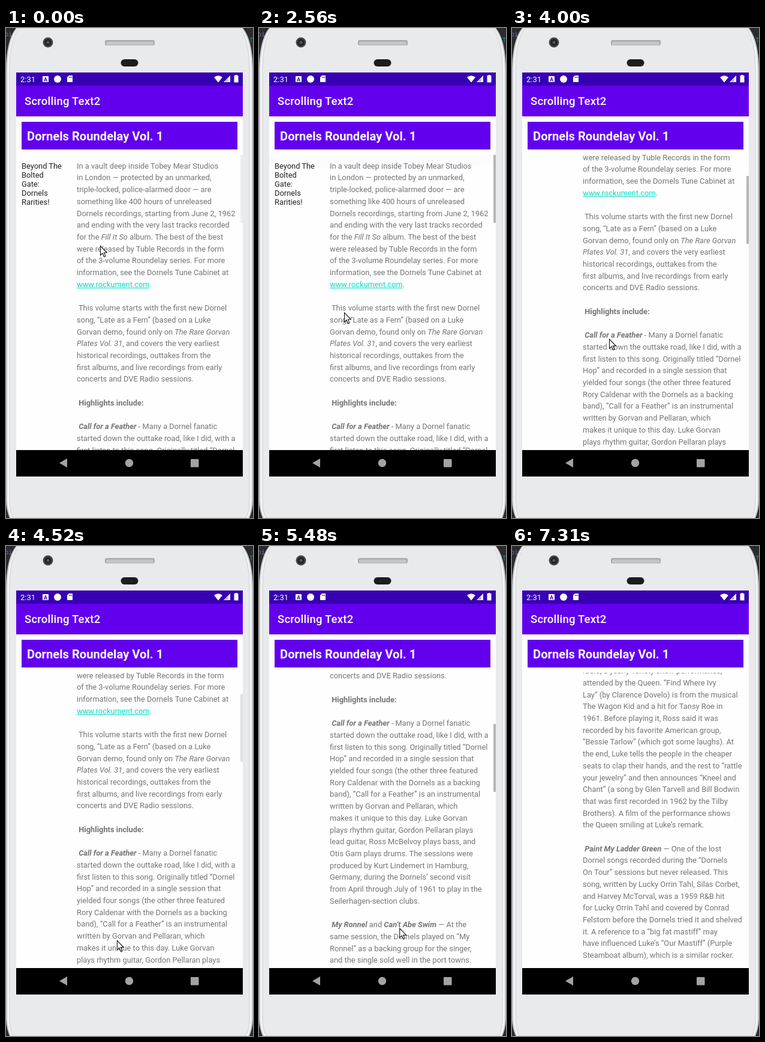
Write an HTML page that moves like this. It is 412 px wide and 815 px high and loops after 7.59 s.

```html
<!DOCTYPE html>
<html lang="en">
<head>
<meta charset="utf-8">
<title>Scrolling Text2</title>
<style>
  html, body { margin: 0; width: 100%; height: 100%; overflow: hidden; background: #2b2b2e; }
  #stage { position: relative; width: 412px; height: 815px; overflow: hidden; font-family: Roboto, sans-serif; }
  #stage > *, #view > * { position: absolute; }
  svg { left: 0; top: 0; }
  .title { left: 31px; top: 111px; font: 500 18.5px/22px Roboto, sans-serif; letter-spacing: .0125em; color: #fff; white-space: pre; }
  .banner { left: 26px; top: 156px; width: 350.5px; height: 46px; padding-left: 9px; background: #6200ee;
    font: 700 20.2px/48px Roboto, sans-serif; color: #fff; white-space: pre; }
  #view { left: 17px; top: 211px; width: 378px; height: 491px; overflow: hidden; }
  #page { left: 0; top: 0; width: 378px; will-change: transform; }
  pre { position: absolute; margin: 0; font: 12.86px/19.7px Roboto, sans-serif; }
  #side { left: 9px; top: 11px; line-height: 15px; color: #222; }
  #body { left: 101px; top: 8.75px; color: #757575; }
  u { color: #03dac5; }
  #bar { left: 374px; top: 0; width: 4px; height: 113px; background: #b6b6b6; }
  .glow { left: -60px; width: 498px; height: 60px; border-radius: 50%; background: #6200ee26; }
  #glowTop { top: -36px; }
  #glowEnd { bottom: -36px; }
</style>
</head>
<body>
<div id="stage">
  <svg width="412" height="815" viewBox="0 0 412 815">
    <rect width="412" height="815" fill="#2b2b2e"/>
    <g font-family="DejaVu Sans Mono, monospace" font-size="10">
      <text x="-2" y="14" fill="#7d68a6">oid</text>
      <text x="406" y="24" fill="#2f8f96">T</text>
    </g>
    <path d="M0 785V72C0 34 7 12 17 0H395C405 12 412 34 412 72V785C412 798 409 808 406 815H6C3 808 0 798 0 785Z" fill="#c2c3c7"/>
    <path d="M2 785V72C2 34 9 12 19 0H393C403 12 410 34 410 72V785C410 798 407 808 404 815H8C5 808 2 798 2 785Z" fill="#f4f4f6"/>
    <path d="M6 785V72C6 34 12 12 22 0H390C400 12 406 34 406 72V785C406 798 404 808 400 815H12C8 808 6 798 6 785Z" fill="#e9eaec" stroke="#cfd0d4"/>
    <circle cx="70" cy="24" r="8.5" fill="#4a4a4d"/>
    <circle cx="70" cy="24" r="6" fill="#242427"/>
    <circle cx="70" cy="24" r="2.5" fill="#55506a"/>
    <rect x="165" y="20" width="83" height="9" rx="3" fill="#a9aaad"/>
    <rect x="167" y="22.5" width="79" height="6" rx="2.5" fill="#c5c6c9"/>
    <rect x="191.5" y="52" width="29" height="12" rx="6" fill="#1d1d20"/>

    <rect x="17" y="74" width="378" height="672" fill="#fefefe"/>
    <rect x="17" y="74" width="378" height="22" fill="#3700b3"/>
    <rect x="17" y="96" width="378" height="51" fill="#6200ee"/>
    <rect x="17" y="702" width="378" height="44"/>
    <g fill="#fff">
      <text x="24" y="90" font-size="13" font-family="Roboto, sans-serif">2:31</text>
      <rect x="61" y="80" width="10" height="10" rx="1"/>
      <circle cx="86" cy="85" r="6"/>
      <path d="M105 79H111V90H102V82Z"/>
      <path d="M347 82Q354 76.5 361 82L354 90.5Z"/>
      <path d="M374 79V90H363Z"/>
      <path d="M382.5 79V78H385.5V79H387.5V90.5H380.5V79Z"/>
    </g>
    <path d="M370.5 83.5V89H365Z" fill="#3700b3" opacity=".35"/>
    <path d="M105.5 81V83M107.5 81V83M109.5 81V83" stroke="#3700b3"/>
    <text x="66" y="88.5" font-size="9" font-weight="700" text-anchor="middle" font-family="Roboto, sans-serif" fill="#3700b3">A</text>
    <g fill="#a3a3a3">
      <path d="M89 723.5L102 716V731Z"/>
      <circle cx="205.5" cy="723.5" r="6.7"/>
      <rect x="308" y="717" width="13.5" height="13.5" rx="1"/>
    </g>
  </svg>
  <div class="title">Scrolling Text2</div>
  <div class="banner">Dornels Roundelay Vol. 1</div>
  <div id="view">
    <div id="page">
<pre id="side">Beyond The
Bolted
Gate:
Dornels
Rarities!</pre>
<pre id="body">In a vault deep inside Tobey Mear Studios
in London — protected by an unmarked,
triple-locked, police-alarmed door — are
something like 400 hours of unreleased
Dornels recordings, starting from June 2, 1962
and ending with the very last tracks recorded
for the <i>Fill It So</i> album. The best of the best
were released by Tuble Records in the form
of the 3-volume Roundelay series. For more
information, see the Dornels Tune Cabinet at
<u>www.rockument.com</u>.

 This volume starts with the first new Dornel
song, “Late as a Fern” (based on a Luke
Gorvan demo, found only on <i>The Rare Gorvan</i>
<i>Plates Vol. 31</i>, and covers the very earliest
historical recordings, outtakes from the
first albums, and live recordings from early
concerts and DVE Radio sessions.

 <b>Highlights include:</b>

 <b><i>Call for a Feather</i></b> - Many a Dornel fanatic
started down the outtake road, like I did, with a
first listen to this song. Originally titled “Dornel
Hop” and recorded in a single session that
yielded four songs (the other three featured
Rory Caldenar with the Dornels as a backing
band), “Call for a Feather” is an instrumental
written by Gorvan and Pellaran, which
makes it unique to this day. Luke Gorvan
plays rhythm guitar, Gordon Pellaran plays
lead guitar, Ross McBelvoy plays bass, and
Otis Garn plays drums. The sessions were
produced by Kurt Lindemert in Hamburg,
Germany, during the Dornels’ second visit
from April through July of 1961 to play in the
Seilerhagen-section clubs.

 <b><i>My Ronnel</i></b> and <b><i>Can’t Abe Swim</i></b> — At the
same session, the Dornels played on “My
Ronnel” as a backing group for the singer,
and the single sold well in the port towns.
“Can’t Abe Swim” has a rough, lively vocal
that hints at the sound still to come. Both
were cut on a stage in a school hall with
the curtains drawn to keep out the noise.

 <b><i>Winter Coat Stomp</i></b> — A home tape made
on a borrowed machine in a front parlor. The
rhythm is tapped out on a tabletop, and you
can hear a kettle boil just before the end.
The tape was lost for years in a shoe box.

 <b><i>Paper Moonbeams</i></b> — An audition piece
recorded on New Year’s morning after a long
drive through the snow. The band was tired
and nervous, and the label turned them down,
saying that guitar groups were on the way
out. The drumming is stiff, but the singing
is strong and the harmonies are in place.

 <b><i>Tell Me Twice</i></b> — An early take, slower
than the single, with no harmonica and a
different middle section. The producer asked
them to speed it up, and by the next session
they had a hit on their hands.

 <b><i>Find Where Ivy Lay</i></b> — This ballad was
a favorite in the clubs and a regular part
of the stage act. The live version included
here comes from a charity concert in London
where the crowd in the balcony was noisy
and the crowd in the boxes was polite. The
group played four songs that evening, near
the middle of the bill. It was taped for
radio, a yearly variety show performance,
attended by the Queen. “Find Where Ivy
Lay” (by Clarence Dovelo) is from the musical
The Wagon Kid and a hit for Tansy Roe in
1961. Before playing it, Ross said it was
recorded by his favorite American group,
“Bessie Tarlow” (which got some laughs). At
the end, Luke tells the people in the cheaper
seats to clap their hands, and the rest to “rattle
your jewelry” and then announces “Kneel and
Chant” (a song by Glen Tarvell and Bill Bodwin
that was first recorded in 1962 by the Tilby
Brothers). A film of the performance shows
the Queen smiling at Luke’s remark.

 <b><i>Paint My Ladder Green</i></b> — One of the lost
Dornel songs recorded during the “Dornels
On Tour” sessions but never released. This
song, written by Lucky Orrin Tahl, Silas Corbet,
and Harvey McTorval, was a 1959 R&amp;B hit
for Lucky Orrin Tahl and covered by Conrad
Felstom before the Dornels tried it and shelved
it. A reference to a “big fat mastiff” may
have influenced Luke’s “Our Mastiff” (Purple
Steamboat album), which is a similar rocker.

 <b><i>Six Under 414</i></b> — A song recorded for the <i>Fill</i>
<i>It So</i> album was actually worked on way back
in the beginning, six years earlier. This take
shows how they did it much more slowly, with
an R&amp;B feel to it.</pre>
    </div>
    <div id="glowTop" class="glow"></div>
    <div id="glowEnd" class="glow"></div>
    <div id="bar"></div>
  </div>
  <svg id="cursor" width="14" height="22" viewBox="-1 -1 14 22">
    <path d="M.5 .5V16L4 12.7L6.5 18.5L9 17.4L6.5 11.8H11.3Z" fill="#fff" stroke="#111" stroke-width="1.1"/>
  </svg>
</div>
<script>
const LOOP = 7590, STEP = 133.4, PHASE = 42;
const VIEW = 491, PAGE = 2126, FLING = 240;

const $ = id => document.getElementById(id);
const clamp = (v, lo = 0, hi = 1) => Math.min(hi, Math.max(lo, v));
const mix = (a, b, p) => a + (b - a) * p;
const smooth = p => p * p * (3 - 2 * p);

// Pointer glides; a drag takes the page along and may end in a fling
const move = (from, to, x, y) => ({ from, to, x, y });
const drag = (from, to, x, y, fling = 0) => ({ from, to, x, y, fling, drag: true });
const glides = [
  drag(90, 540, 160, 427),
  move(1080, 1420, 132, 470),
  drag(1700, 2000, 139, 395),
  drag(2400, 2490, 142, 473),
  move(2620, 2900, 155, 669),
  drag(3150, 3950, 162, 517),
  move(4230, 4500, 185, 656),
  drag(4500, 4890, 193, 494),
  drag(5000, 5160, 200, 440),
  move(5300, 5440, 235, 640),
  drag(5440, 5700, 240, 452, 1120),
  drag(5980, 6220, 252, 475),
  drag(6330, 6640, 258, 568),
  move(6700, 7290, 300, 830)
];

function pose(t) {
  let x = 157, y = 362, scroll = 0, glow = 0, released = -590;
  for (const g of glides) {
    if (t < g.from) break;
    const p = smooth(clamp((t - g.from) / (g.to - g.from)));
    const nextY = mix(y, g.y, p);
    if (g.drag) {
      const coast = 1 - (1 - clamp((t - g.to) / FLING)) ** 2;
      const want = scroll + y - nextY + g.fling * coast;
      scroll = clamp(want, 0, PAGE - VIEW);
      released = g.to + (g.fling ? FLING : 0);
      glow = clamp((want - scroll) / 40, -1, 1) * clamp(1 - (t - released) / 400);
    }
    x = mix(x, g.x, p);
    y = nextY;
  }
  return { x, y, scroll, glow, bar: clamp(1 - (t - released - 400) / 250) };
}

function draw(time) {
  // The screen refreshes at a low, even rate
  const t = Math.max(0, Math.floor((time % LOOP + PHASE) / STEP) * STEP - PHASE);
  const s = pose(t);
  $('page').style.transform = `translateY(${-s.scroll}px)`;
  $('bar').style.transform = `translateY(${s.scroll * VIEW / PAGE}px)`;
  $('bar').style.opacity = s.bar;
  $('glowTop').style.opacity = clamp(-s.glow);
  $('glowEnd').style.opacity = clamp(s.glow);
  $('cursor').style.transform = `translate(${s.x - 1}px, ${s.y - 1}px)`;
}

const start = performance.now();
(function loop() {
  draw(performance.now() - start);
  requestAnimationFrame(loop);
})();
</script>
</body>
</html>
```
